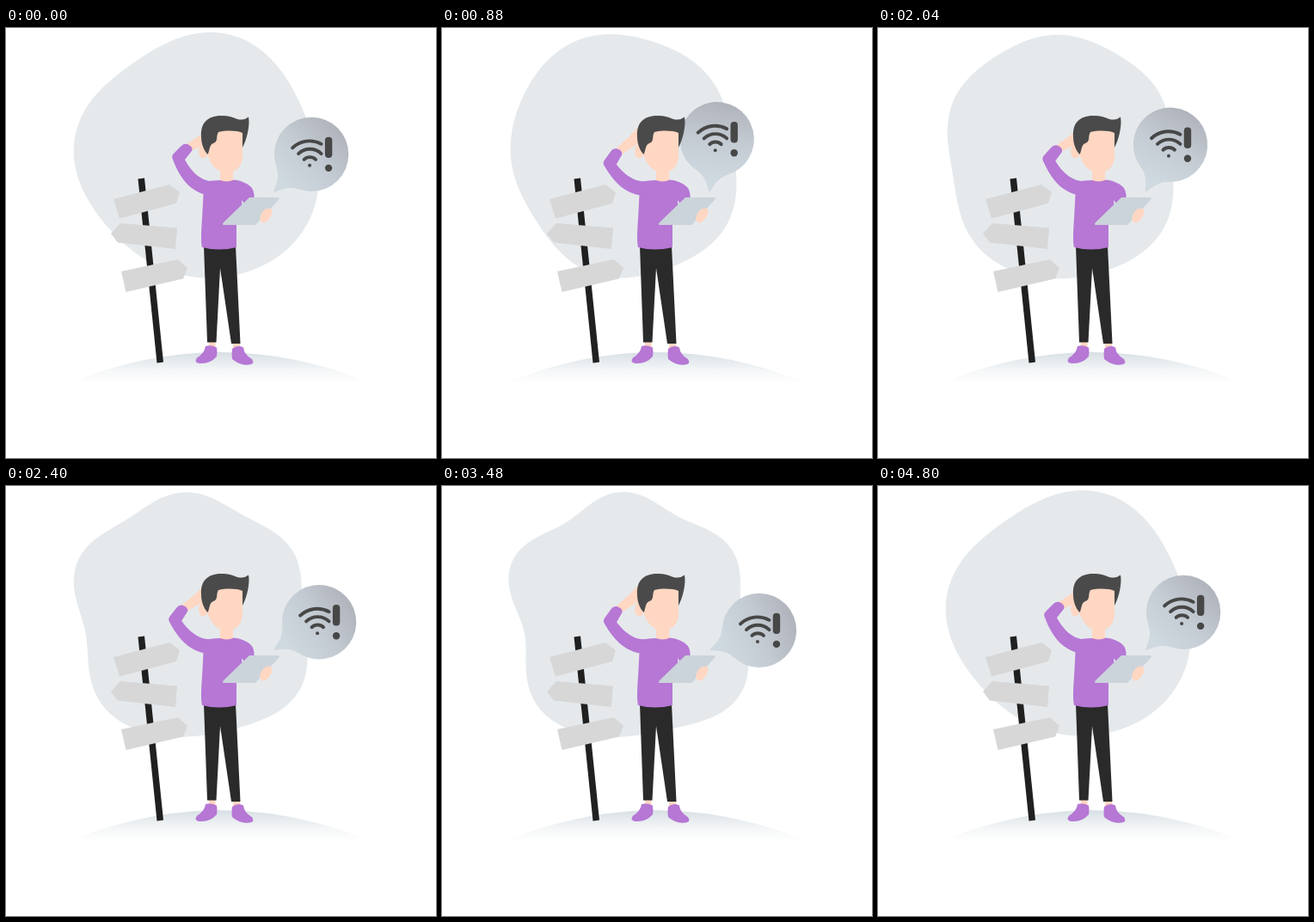
Write an HTML page that moves like this. It is 500 by 500 pixels and loops after 4.84 s.

```html
<!DOCTYPE html>
<html lang="en">
<head>
<meta charset="utf-8">
<title>No connection</title>
<style>
html, body { margin: 0; width: 100%; height: 100%; overflow: hidden; background: #fff; }
svg { display: block; width: 100%; height: 100%; }
</style>
</head>
<body>
<svg viewBox="0 0 500 500" xmlns="http://www.w3.org/2000/svg">
  <defs>
    <linearGradient id="bubbleFill" gradientUnits="userSpaceOnUse" x1="0" y1="-106" x2="0" y2="-15">
      <stop offset="0" stop-color="#b0b3bb"/>
      <stop offset=".5" stop-color="#c4cbd3"/>
      <stop offset="1" stop-color="#cfd9e0"/>
    </linearGradient>
    <linearGradient id="groundFill" gradientUnits="userSpaceOnUse" x1="0" y1="377" x2="0" y2="413">
      <stop offset="0" stop-color="#d8e0e5"/>
      <stop offset=".6" stop-color="#f5f7f8"/>
      <stop offset="1" stop-color="#fff"/>
    </linearGradient>
  </defs>

  <path id="blob" fill="#e5e9ec"/>
  <path d="M76 412Q249 342 422 412Z" fill="url(#groundFill)"/>

  <g id="signpost">
    <path d="M153.5 175.5L161 174.5L183 388.5L175.5 389.5Z" fill="#202020"/>
    <g fill="#d7d7d7">
      <path d="M125 199L190 182L202 191L198 204L132 221.5Z"/>
      <path d="M133 227L199 232.5L197 257L130 249.5L122 239Z"/>
      <path d="M134 283L200 269L211 279L206 291.5L139.5 307Z"/>
    </g>
  </g>

  <g id="bubble" fill="url(#bubbleFill)">
    <path d="M0 0C4 -7 6 -17 18 -23L0 -50L-18 -23C-6 -17 -4 -7 0 0Z"/>
    <circle cy="-62.4" r="43.2"/>
  </g>
  <g id="icon" fill="#474747">
    <g fill="none" stroke="#474747" stroke-width="3.9" stroke-linecap="round">
      <path d="M-22 -7.5A28.5 28.5 0 0 1 11.5 -12"/>
      <path d="M-15 -.8A19.2 19.2 0 0 1 11.5 -.8"/>
      <path d="M-8.5 6A9.8 9.8 0 0 1 5 6"/>
    </g>
    <circle cx="-2" cy="13" r="2"/>
    <rect x="15.8" y="-20.2" width="8.4" height="24.4" rx="4"/>
    <circle cx="20" cy="16" r="4.2"/>
  </g>

  <g id="arm">
    <path d="M207 137L228 123.500L239 115L247 118L238 133L214 143Z" fill="#ffd7c2"/>
    <path d="M238 178C224 177 213 163 208 153L216 143Q218 138 211 135Q207 134 204 137L195 146Q192 149 194 153C201 171 211 188 232 194Z" fill="#b677d5"/>
  </g>

  <g id="person">
    <g fill="#ffd7c2">
      <ellipse cx="229.5" cy="143.5" rx="5.5" ry="8"/>
      <path d="M249 162H264V175Q267 179 257 180Q247 179 249 175Z"/>
      <path d="M236 364H243.500V373H236Z"/>
      <path d="M264 365H272V375H264Z"/>
    </g>
    <path d="M230 253H267L272.500 367H262L249 279L244.500 365.500H234Z" fill="#2a2a2a"/>
    <g fill="#b677d5">
      <path d="M232 370Q238 368 245 371.500Q246 377 245 382Q237 391 225 390Q218 389 222 383.500Q231 378 232 370Z"/>
      <path d="M263 373Q269 368 276 371.500Q277 380 286 385Q290 391 282 391.500Q273 393 263 385Q262 379 263 373Z"/>
      <path d="M230 179Q241 177 249 177Q257 180 265 176.500Q278 178 285 185Q289 189 288.500 198L268 228V255Q248 260 228 255Q226 248 228 222L229.500 194Z"/>
    </g>
    <path d="M274 200L276.500 203.500L274.500 207Z" fill="#e5e9ec"/>
    <path d="M283 197H316Q319 197 317 200L290 229H253Q251 229 253 226Z" fill="#cbd4da"/>
    <path d="M295 222Q297 213 301 211Q307 208 309 211Q311 217 304 224Q298 230 295 222Z" fill="#ffd7c2"/>
    <path d="M240 118H275V151C274 162 266 168 257 168C245 168 237 158 234 146Z" fill="#ffd7c2"/>
    <path d="M227 126C226 111 234 102 250 102C262 101 268 107 274 106.500Q279 106 282 103.500C284 113 280 130 275 139V122C268 119 256 119 247 121C244 125 247 133 241 134C236 136 237 143 234.500 147C230 142 227 135 227 126Z" fill="#4a4a4a"/>
  </g>
</svg>
<script>
const LOOP = 4840;
const byId = id => document.getElementById(id);
const blob = byId('blob'), bubble = byId('bubble'), icon = byId('icon'), arm = byId('arm');
const rad = deg => deg * Math.PI / 180;

// A wobbly circle: a mean radius plus waves, each [lobes, height, direction of first crest].
const wobbly = (mean, ...waves) => deg => waves.reduce(
  (r, [lobes, height, crest]) => r + height * Math.cos(rad(lobes * deg - crest)), mean);

const pebble = wobbly(140, [1, 10.7, 2], [2, 2.9, 82], [3, 5.6, 158], [4, 3, 68]);
const round = wobbly(136.4, [1, 2.9, 205], [2, 7.4, 138], [4, 1.5, 132], [5, 2.6, 163]);
const full = wobbly(137.6, [1, 4.7, 180], [2, 6.4, 160], [4, 2.2, 170]);
const wavy = wobbly(140.2, [1, 6.9, 58], [2, 4, 119], [3, 2, 28], [4, 6.4, 138], [5, 6.2, 248], [6, 5.1, 160]);

const blobKeys = [[0, pebble], [.2, round], [.35, full], [.7, wavy], [1, pebble]];
const armKeys = [[0, 0], [.2, -9.5], [.35, 0], [.7, -9.5], [1, 0]];
const bubbleKeys = [[0, 45], [.35, 0], [.66, 75.5], [1, 45]];

// cubic-bezier(.25, .1, .25, 1)
function ease(x) {
  const curve = (s, a, b) => 3 * (1 - s) * (1 - s) * s * a + 3 * (1 - s) * s * s * b + s * s * s;
  let lo = 0, hi = 1;
  for (let i = 0; i < 24; i++) {
    const mid = (lo + hi) / 2;
    if (curve(mid, .25, .25) < x) lo = mid; else hi = mid;
  }
  return curve(lo, .1, 1);
}

const mix = (a, b, k) => a + (b - a) * k;

// The two keys around p and the eased way between them.
function between(keys, p) {
  const i = keys.findIndex(([end]) => end > p);
  const [from, a] = keys[i - 1], [to, b] = keys[i];
  return [a, b, ease((p - from) / (to - from))];
}

function outline(radius) {
  const pts = [];
  for (let deg = 0; deg < 360; deg += 3) {
    const r = radius(deg);
    pts.push((215 + r * Math.cos(rad(deg))).toFixed(2) + ' ' + (150 + r * Math.sin(rad(deg))).toFixed(2));
  }
  return 'M' + pts.join('L') + 'Z';
}

function draw(ms) {
  const p = ms % LOOP / LOOP;
  const [a, b, k] = between(blobKeys, p);
  blob.setAttribute('d', outline(deg => mix(a(deg), b(deg), k)));
  arm.setAttribute('transform', `rotate(${mix(...between(armKeys, p))} 239 187)`);

  // The bubble swings about the tip of its tail; the icon stays upright.
  const swing = mix(...between(bubbleKeys, p));
  bubble.setAttribute('transform', `translate(311 191) rotate(${swing})`);
  icon.setAttribute('transform',
    `translate(${311 + 62.4 * Math.sin(rad(swing))} ${191 - 62.4 * Math.cos(rad(swing))})`);
}

const begin = performance.now();
function tick() {
  draw(performance.now() - begin);
  requestAnimationFrame(tick);
}
tick();
</script>
</body>
</html>
```
